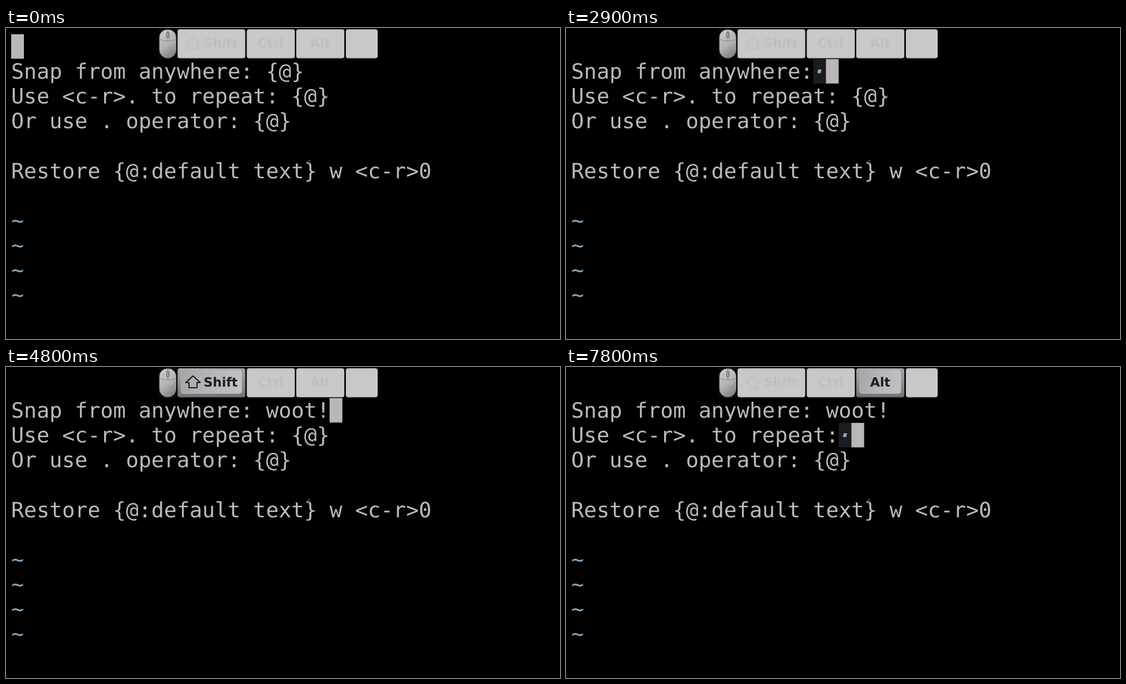
Write an HTML page with a canvas that moves like this. It is 960 by 540 pixels and loops after 8000 ms.

```html
<!DOCTYPE html>
<html lang="en">
<head>
<meta charset="utf-8">
<title>Snippet demo</title>
<style>
  html, body { margin: 0; width: 100%; height: 100%; overflow: hidden; background: #000; }
  canvas { display: block; }
</style>
</head>
<body>
<canvas id="stage" width="960" height="540"></canvas>
<script>
const ctx = document.getElementById('stage').getContext('2d');
ctx.textRendering = 'geometricPrecision';

const LOOP = 8000, CELL_W = 22.07, ROW_H = 43.12, LEFT = 9, TOP = 10.8;
const TEXT = '#bab9bb', CURSOR = '#bab7bb', BLUE = '#85a9c6';
const MONO = '36.66px "DejaVu Sans Mono", monospace';
const BOLD = '"DejaVu Sans", sans-serif';

// Each step changes only the listed fields from its time on.
const STEPS = [
  [0, { keys: '', char: '', row: 0, col: 0, first: ' {@}', second: ' {@}' }],
  [1500, { keys: 'Alt' }],
  [1700, { char: 'j', row: 1, col: 20, first: '·' }],
  [2100, { keys: '', char: '' }],
  [3200, { char: 'w', col: 21, first: ' w' }],
  [3400, { char: 'o', col: 22, first: ' wo' }],
  [3600, { col: 23, first: ' woo' }],
  [3800, { char: 't', col: 24, first: ' woot' }],
  [4100, { keys: 'Shift' }],
  [4200, { char: '1', col: 25, first: ' woot!' }],
  [4800, { char: '' }],
  [5300, { keys: '' }],
  [6800, { keys: 'Alt' }],
  [7000, { char: 'j', row: 2, col: 22, second: '·' }],
  [7800, { char: '' }]
];

const stateAt = t => Object.assign({}, ...STEPS.filter(s => s[0] <= t).map(s => s[1]));
const cellX = col => LEFT + col * CELL_W;
const cellY = row => TOP + row * ROW_H;

function cell(col, row, color) {
  ctx.fillStyle = color;
  ctx.fillRect(cellX(col), cellY(row), CELL_W, 42.5);
}

function line(row, text, color = TEXT) {
  ctx.textAlign = 'left';
  [...text].forEach((ch, col) => {
    const dot = ch === '·';
    if (dot) cell(col, row, '#1c1c1e');
    ctx.fillStyle = dot ? BLUE : color;
    ctx.font = dot ? 'oblique bold ' + MONO : MONO;
    ctx.fillText(ch, cellX(col), cellY(row) + 34.2);
  });
}

function gradient(x0, y0, x1, y1, ...colors) {
  const g = ctx.createLinearGradient(x0, y0, x1, y1);
  colors.forEach((c, i) => g.addColorStop(i / (colors.length - 1), c));
  return g;
}

function box(x, y, w, h, r, fill, stroke) {
  ctx.beginPath();
  ctx.roundRect(x, y, w, h, r);
  if (fill) { ctx.fillStyle = fill; ctx.fill(); }
  if (stroke) { ctx.strokeStyle = stroke; ctx.lineWidth = 1; ctx.stroke(); }
}

function shiftArrow(color) {
  ctx.beginPath();
  [[324, 15.5], [336.5, 27], [331, 27], [331, 36], [317, 36], [317, 27], [311.5, 27]]
    .forEach(p => ctx.lineTo(...p));
  ctx.closePath();
  ctx.lineJoin = 'round';
  ctx.strokeStyle = color;
  ctx.lineWidth = 2;
  ctx.stroke();
}

function key(x, w, label, down, labelX, size = 22) {
  if (down) {
    box(x, 2.3, w, 50.2, 4, gradient(x, 2, x, 53, '#a5a4a7', '#8f8e91', '#737275'));
    box(x + 6, 5, w - 12, 41, 4, gradient(x, 5, x + w, 30, '#a3a2a5', '#b7b5b9', '#c3c1c5'), '#b9b7bb');
  } else {
    box(x, 2.3, w, 50.2, 4, '#cac7cb');
  }
  const color = down ? '#1d1d1f' : '#c1bec2';
  if (label === 'Shift') shiftArrow(color);
  ctx.font = `bold ${size}px ${BOLD}`;
  ctx.textAlign = 'center';
  ctx.fillStyle = color;
  ctx.fillText(label, labelX, 26 + size * .365);
}

function mouse() {
  box(266, 3, 28.5, 49, [13, 13, 14, 14], gradient(266, 8, 295, 48, '#cac8cb', '#b4b2b5', '#7b7a7d'), '#8a898c');
  ctx.strokeStyle = '#88868a';
  ctx.beginPath();
  ctx.moveTo(267, 20);
  ctx.quadraticCurveTo(280, 25, 294, 20);
  ctx.moveTo(280.5, 3);
  ctx.lineTo(280.5, 22);
  ctx.stroke();
  box(278.5, 7, 4, 10, 2, '#aaa8ac', '#4a494c');
}

function pointer() {
  ctx.strokeStyle = '#656467';
  ctx.lineWidth = 1;
  ctx.beginPath();
  ctx.moveTo(522, 230.5); ctx.lineTo(528, 230.5);
  ctx.moveTo(524.5, 230); ctx.lineTo(524.5, 239);
  ctx.moveTo(522, 235.5); ctx.lineTo(527, 235.5);
  ctx.stroke();
}

function draw(t) {
  const s = stateAt(t);
  ctx.fillStyle = '#000';
  ctx.fillRect(0, 0, 960, 540);

  line(1, 'Snap from anywhere:' + s.first);
  line(2, 'Use <c-r>. to repeat:' + s.second);
  line(3, 'Or use . operator: {@}');
  line(5, 'Restore {@:default text} w <c-r>0');
  for (let row = 7; row < 11; row++) line(row, '~', BLUE);
  cell(s.col, s.row, CURSOR);
  pointer();

  box(264, 1, 381, 53, 3, '#09090a');
  mouse();
  key(297.3, 117.2, 'Shift', s.keys === 'Shift', 372);
  key(417.3, 83.2, 'Ctrl', false, 458.5);
  key(503, 83.2, 'Alt', s.keys === 'Alt', 544.5);
  key(589, 55, s.char, !!s.char, 616, 30);
}

function frame(now) {
  draw(now % LOOP);
  requestAnimationFrame(frame);
}
draw(0);
requestAnimationFrame(frame);
</script>
</body>
</html>
```
